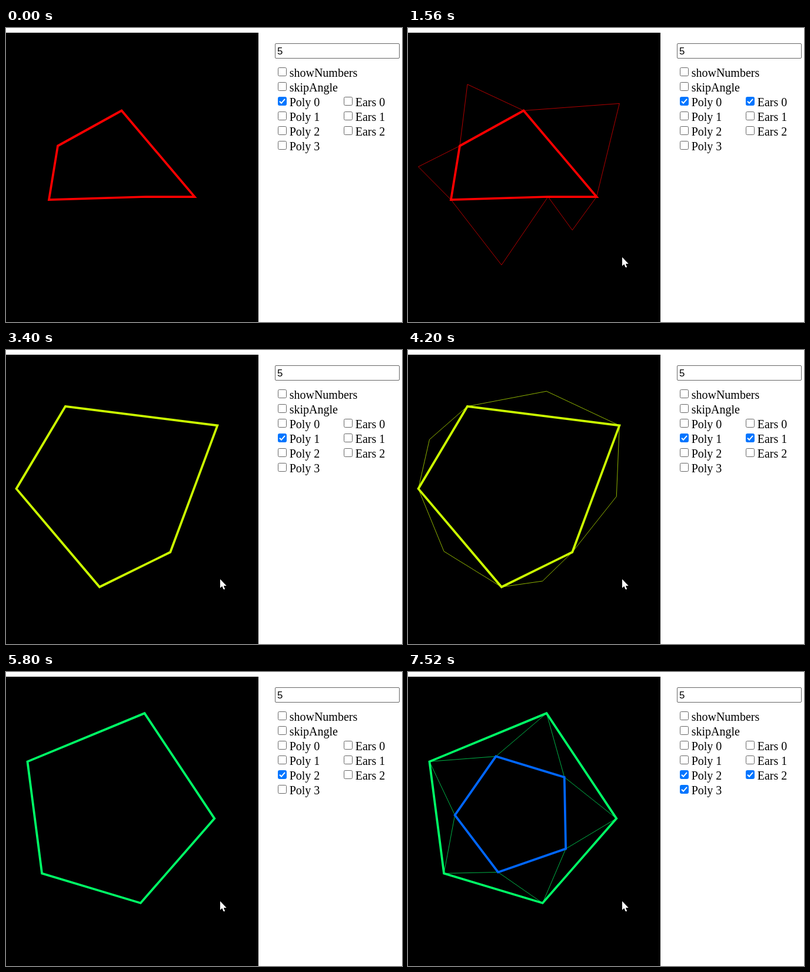
These frames come from a looping animation (673 px wide and 500 px high, 8 s). An HTML page:

```html
<!DOCTYPE html>
<html>
<head>
<meta charset="utf-8">
<style>
html, body { margin: 0; width: 100%; height: 100%; overflow: hidden; background: #fff; }
svg { display: block; }
text { font: 20px "Liberation Serif", "Times New Roman", serif; }
.field { font: 16.7px "Liberation Sans", Arial, sans-serif; }
.box { fill: #fff; stroke: #666; }
.on .box { fill: #0075ff; stroke: #0075ff; }
.tick { fill: none; stroke: #fff; stroke-width: 2; visibility: hidden; }
.on .tick { visibility: visible; }
</style>
</head>
<body>
<svg width="673" height="500">
  <rect y="8" width="429" height="492"/>
  <g id="shapes" fill="none"></g>
  <rect x="457.5" y="26.5" width="211" height="25" rx="1.5" class="box"/>
  <text x="461" y="45" class="field">5</text>
  <g id="controls"></g>
  <path id="cursor" d="M0 0V15L3.3 12 5.6 17.3H8.2L6 11.2H10.7Z" fill="#fff" stroke="#000" stroke-width="2" paint-order="stroke"/>
</svg>
<script>
const $ = id => document.getElementById(id);

function add(parent, tag, attrs, text = '') {
  const el = document.createElementNS('http://www.w3.org/2000/svg', tag);
  for (const key in attrs) el.setAttribute(key, attrs[key]);
  el.textContent = text;
  return parent.appendChild(el);
}

function checkbox(label, x, row) {
  const g = add($('controls'), 'g', { transform: `translate(${x} ${67 + row * 25})` });
  add(g, 'rect', { class: 'box', x: .5, y: .5, width: 14, height: 14, rx: 2 });
  add(g, 'path', { class: 'tick', d: 'M3 7.8L6 10.8 12 3.8' });
  add(g, 'text', { x: 19.7, y: 16 }, label);
  return g;
}

// Petr-Douglas-Neumann: ears with apex angles of 1, 2, 3 fifths of a turn
// lead from any pentagon to a regular one.
const edges = poly => poly.map((p, j) => [p, poly[(j + 1) % poly.length]]);

function earApexes(poly, step) {
  const height = .5 / Math.tan(Math.PI * step / poly.length);
  return edges(poly).map(([[ax, ay], [bx, by]]) => [
    (ax + bx) / 2 + (by - ay) * height,
    (ay + by) / 2 - (bx - ax) * height
  ]);
}

const LOOP = 8000;
const clicks = [1560, 2480, 3400, 4200, 5000, 5800, 6640, 7520];
const outline = points => 'M' + points.join('L') + 'Z';
const items = [];

// Each round takes three clicks: ears on, next polygon on, old pair off.
function addItem(kind, i, x, d, width, firstClick) {
  const stroke = `hsl(${72 * i} 100% 50%)`;
  items.push({
    shape: add($('shapes'), 'path', { d, stroke, 'stroke-width': width }),
    box: checkbox(`${kind} ${i}`, x, i + 2),
    from: clicks[firstClick] ?? 0,
    to: clicks[3 * i + 2] ?? LOOP
  });
}

checkbox('showNumbers', 462, 0);
checkbox('skipAngle', 462, 1);
let poly = [[88, 200.5], [196.5, 140.5], [320.5, 287], [238, 287], [73, 292]];
for (let i = 0; i < 4; i++) {
  const next = earApexes(poly, i + 1);
  if (i < 3) {
    const ears = edges(poly).map(([a, b], j) => outline([a, next[j], b])).join('');
    addItem('Ears', i, 574, ears, .7, 3 * i);
  }
  addItem('Poly', i, 462, outline(poly), 3.75, 3 * i - 2);
  poly = next;
}

function draw(now) {
  const t = now % LOOP;
  for (const { shape, box, from, to } of items) {
    const on = t >= from && t < to;
    shape.style.display = on ? '' : 'none';
    box.classList.toggle('on', on);
  }
  // The pointer glides in over ten short hops.
  const hop = Math.min(10, Math.floor((t - 240) / 68));
  const left = (1 - hop / 10) ** 2;
  $('cursor').style.display = hop < 0 ? 'none' : '';
  $('cursor').setAttribute('transform', `translate(${364 + 147 * left} ${389.7 + 98 * left})`);
}

function loop() {
  draw(performance.now());
  requestAnimationFrame(loop);
}
loop();
</script>
</body>
</html>
```
